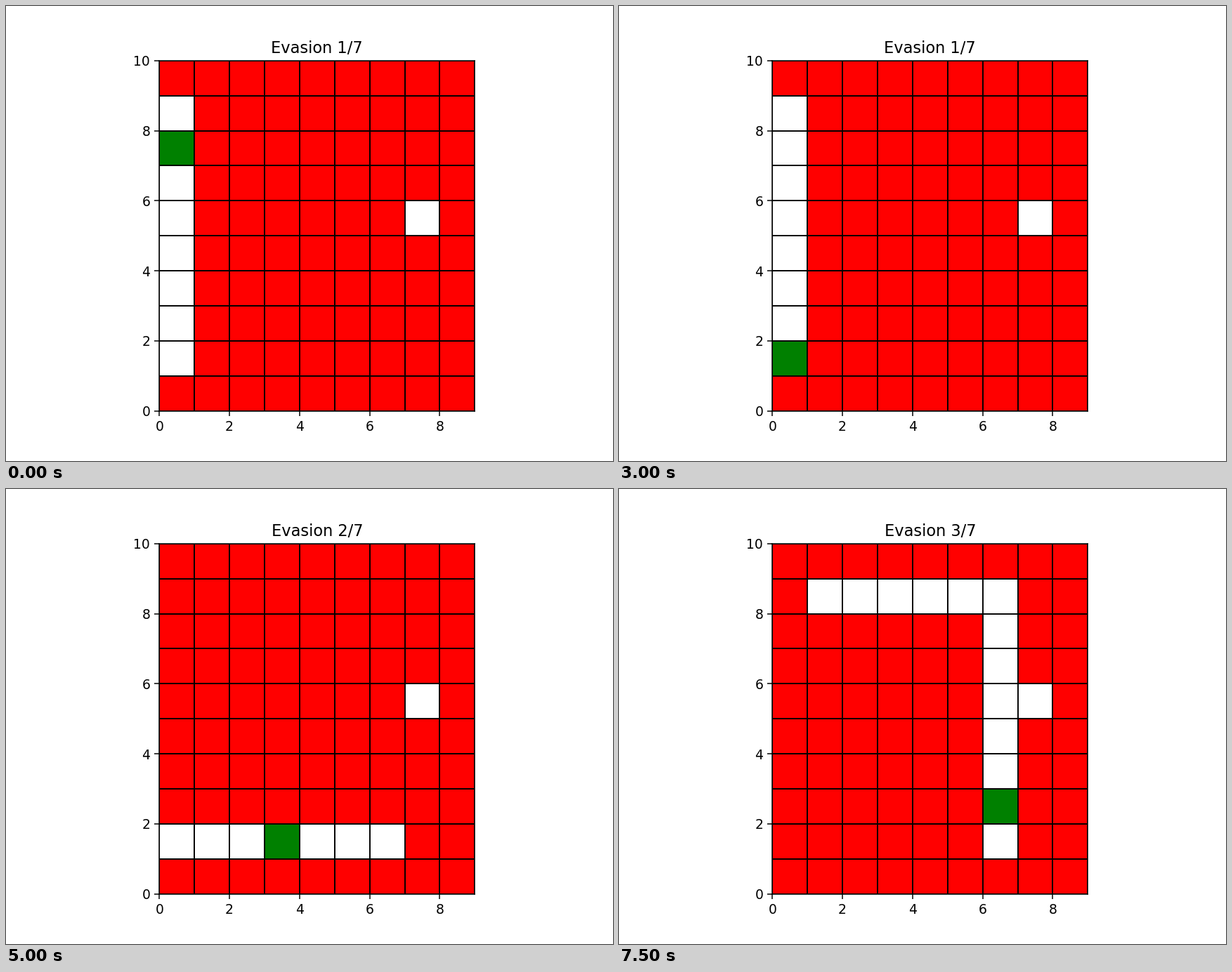
A matplotlib script that plays this animation: 864 by 648 pixels, repeating every 8 s.

```python
import numpy as np
import matplotlib.pyplot as plt
from matplotlib.animation import FuncAnimation
from matplotlib.colors import ListedColormap

plt.rcParams["font.family"] = "DejaVu Sans"

DPI = 135
COLS, ROWS = 9, 10
FREE, WALL, PLAYER = range(3)
EXIT = (7, 5)


def line(x0, y0, x1, y1):
    """Cells of a straight corridor, both ends included."""
    n = max(abs(x1 - x0), abs(y1 - y0))
    return [(x0 + (x1 - x0) * i // n, y0 + (y1 - y0) * i // n) for i in range(n + 1)]


# (corridor cells, cells walked through)
LEVELS = [
    (line(0, 8, 0, 1), line(0, 7, 0, 1)),
    (line(0, 1, 6, 1), line(0, 1, 6, 1)),
    (line(1, 8, 6, 8) + line(6, 8, 6, 1), line(6, 1, 6, 2)),
]
STEPS = [(level, cell) for level, (_, walk) in enumerate(LEVELS) for cell in walk]


def maze(level, player):
    grid = np.full((ROWS, COLS), WALL)
    for x, y in LEVELS[level][0] + [EXIT]:
        grid[y, x] = FREE
    grid[player[1], player[0]] = PLAYER
    return grid


fig, ax = plt.subplots(figsize=(864 / DPI, 648 / DPI), dpi=DPI)
mesh = ax.pcolormesh(
    maze(*STEPS[0]),
    cmap=ListedColormap(["white", "red", "green"]),
    vmin=FREE,
    vmax=PLAYER,
    edgecolors="black",
    linewidth=1,
    antialiased=True,
)
ax.set_aspect("equal")
ax.set_xlim(0, COLS)
ax.set_ylim(0, ROWS)
ax.set_xticks(range(0, COLS, 2))
ax.set_yticks(range(0, ROWS + 1, 2))
title = ax.set_title("")


def update(i):
    level, player = STEPS[i]
    mesh.set_array(maze(level, player))
    title.set_text(f"Evasion {level + 1}/7")
    return mesh, title


anim = FuncAnimation(fig, update, frames=len(STEPS), interval=500, repeat=True)
plt.show()
```
